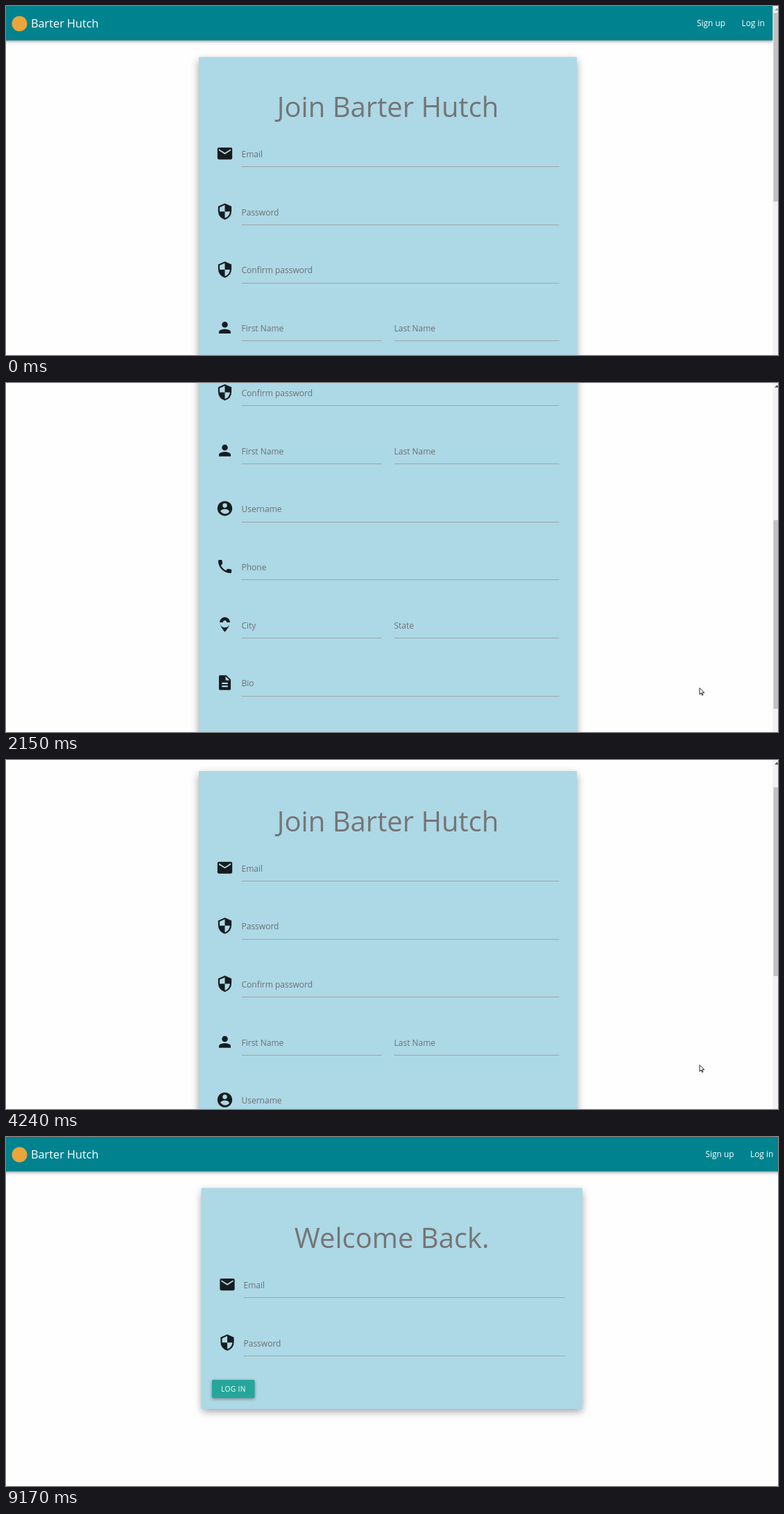
An HTML page with a canvas for the animation above (9710 ms loop, 1113 by 503 pixels).

```html
<!DOCTYPE html>
<html lang="en">
<head>
<meta charset="utf-8">
<title>Barter Hutch</title>
<style>
  html, body { margin: 0; width: 100%; height: 100%; overflow: hidden; background: #fefefe; }
  canvas { display: block; }
</style>
</head>
<body>
<canvas id="stage" width="1113" height="503"></canvas>
<script>
const W = 1113, H = 503, LOOP = 9710, LOGIN_AT = 6290;
const BRAND = 'Barter Hutch';
const CARD = '#add8e6', INK = '#161c1e';
const ROW_PITCH = 83.66;
const ctx = document.getElementById('stage').getContext('2d');

// Icons live on a 24-unit grid: an ink outline and the holes cut from it
const disc = (x, y, r) => `M${x - r} ${y}a${r} ${r} 0 1 0 ${2 * r} 0a${r} ${r} 0 1 0 ${-2 * r} 0Z`;
const box = (x, y, w, h) => `M${x} ${y}h${w}v${h}h${-w}Z`;
const bust = (r, top) => `M${12 - r} ${top + 4}c0-3 ${r - 3}-4 ${r}-4s${r} 1 ${r} 4`;
const icon = (ink, holes = '') => [new Path2D(ink), new Path2D(holes)];
const icons = {
  mail: icon('M4 4H20Q22 4 22 6V18Q22 20 20 20H4Q2 20 2 18V6Q2 4 4 4Z', 'M4 6L12 11 20 6V8L12 13 4 8Z'),
  shield: icon('M12 1L3 5V11Q3 20 12 23 21 20 21 11V5Z', 'M12 3.2V12H5V6.3ZM12 12H19Q18 19 12 21Z'),
  person: icon(disc(12, 8, 4) + bust(8, 14) + 'v2H4Z'),
  account: icon(disc(12, 12, 10), disc(12, 8, 3) + bust(6, 12.9) + 'Q12 22.4 6 16Z'),
  phone: icon('M4 3H8L9 8 6.6 10.8Q9 15 13.2 17.4L16 15 21 16V20L20 21C10.6 21 3 13.4 3 4Z'),
  place: icon(disc(12, 9, 7) + 'M19 9C19 14 12 22 12 22S5 14 5 9Z', disc(12, 9, 2.5)),
  page: icon('M5 2H14L20 8V21L19 22H5L4 21V3Z', box(8, 12, 8, 2) + box(8, 16, 8, 2) + 'M13 3.5V9H18.5Z'),
  camera: icon(box(2, 5, 20, 16) + 'M7 5L9 3H15L17 5Z', disc(12, 13, 5) + 'M12 9L8 13 12 17 16 13Z')
};
const arrow = new Path2D('M0 0V17L4 13 6.5 19 9 18 6.5 12H12Z');
const hand = new Path2D('M-1 1Q0-1 1 1V5L6 6 7 7V9L6 13H-1L-4 8-3 7-1 8Z');

const signupRows = [
  ['mail', 'Email'], ['shield', 'Password'], ['shield', 'Confirm password'],
  ['person', 'First Name', 'Last Name'], ['account', 'Username'], ['phone', 'Phone'],
  ['place', 'City', 'State'], ['page', 'Bio'], ['camera', 'Profile picture link']
];

const ramp = (t, from, to) => Math.min(1, Math.max(0, (t - from) / (to - from)));
const smooth = u => u * u * (3 - 2 * u);
const progress = (t, from, to) => smooth(ramp(t, from, to));

const scrollAt = t =>
  278 * progress(t, 510, 1300) +
  117 * progress(t, 1690, 2370) +
  53 * progress(t, 2460, 2600) -
  448 * ramp(t, 3683, 4323);

// Each glide: start, end, shift in x, shift in y
const glides = [
  [90, 360, -50.5, -52.5], [4600, 5090, 52, -290], [5230, 5980, 25, -103],
  [6440, 7010, -88, 214], [7140, 7430, -195, 61], [7430, 7670, 104, 78],
  [7930, 8480, 110, 74], [8700, 9170, 36, 31]
];
const pointerAt = t => glides.reduce(([x, y], [from, to, dx, dy]) => {
  const u = progress(t, from, to);
  return [x + dx * u, y + dy * u];
}, [1050, 492]);

function rect(x, y, w, h, color) {
  ctx.fillStyle = color;
  ctx.fillRect(x, y, w, h);
}

function text(str, x, y, size, color, align = 'left') {
  ctx.font = `${size}px "Open Sans", "Noto Sans", sans-serif`;
  ctx.textAlign = align;
  ctx.fillStyle = color;
  ctx.fillText(str, x, y);
}

function raised(x, y, w, h, color, blur, drop, alpha, radius = 0) {
  ctx.save();
  ctx.shadowColor = `rgba(0,0,0,${alpha})`;
  ctx.shadowBlur = blur;
  ctx.shadowOffsetY = drop;
  ctx.fillStyle = color;
  ctx.beginPath();
  ctx.roundRect(x, y, w, h, radius);
  ctx.fill();
  ctx.restore();
}

function placed(x, y, scale, paint) {
  ctx.save();
  ctx.translate(x, y);
  ctx.scale(scale, scale);
  paint();
  ctx.restore();
}

function drawIcon([ink, holes], x, y) {
  placed(x - 12.8, y - 12.8, 25.6 / 24, () => {
    ctx.fillStyle = INK;
    ctx.fill(ink);
    ctx.fillStyle = CARD;
    ctx.fill(holes, 'evenodd');
  });
}

function drawNav(right, hover) {
  raised(-10, -10, right + 10, 59.5, '#00838f', 5, 1.5, .5);
  rect(right - 57, 0, 57, 49.5, `rgba(0,0,0,${.1 * hover})`);
  ctx.fillStyle = '#eba53a';
  ctx.beginPath();
  ctx.arc(19.5, 25.5, 11, 0, 7);
  ctx.fill();
  text(BRAND, 36, 31, 16.3, '#fff');
  text('Sign up', right - 109.5, 29, 11.9, '#fff');
  text('Log in', right - 45, 29, 11.9, '#fff');
}

function drawField(label, x, end, y) {
  text(label, x, y + 4.5, 12, '#6d7173');
  rect(x, Math.round(y + 17.8), end - x, 1, '#9fa5a8');
}

function drawForm(card, title, rows, action, scroll = 0) {
  const { left, width, height, fieldX, fieldEnd } = card;
  raised(left, 73.5 - scroll, width, height, CARD, 11, 4, .38);
  text(title, left + width / 2, 160 - scroll, 40, '#757575', 'center');
  rows.forEach(([name, label, second], i) => {
    const y = 213.5 + ROW_PITCH * i - scroll;
    drawIcon(icons[name], left + 37.5, y - .9);
    drawField(label, fieldX, second ? 541.5 : fieldEnd, y);
    if (second) drawField(second, 559.5, fieldEnd, y);
  });
  const top = Math.round(266.5 + ROW_PITCH * (rows.length - 1) - scroll);
  raised(left + 15.5, top, 61.5, 26, '#26a69a', 4, 1.5, .4, 1.5);
  ctx.letterSpacing = '0.4px';
  text(action, left + 46.4, top + 17, 10.2, '#fff', 'center');
  ctx.letterSpacing = '0px';
}

function drawScrollbar(scroll) {
  rect(1105.5, 0, 8, H, '#f1f1f1');
  rect(1106.5, 10 + .512 * scroll, 7, 272, '#c1c1c1');
  ctx.fillStyle = scroll ? '#505050' : '#a3a3a3';
  ctx.beginPath();
  ctx.moveTo(1108, 6.5);
  ctx.lineTo(1111.5, 3);
  ctx.lineTo(1115, 6.5);
  ctx.fill();
}

function drawSignup(t) {
  const scroll = Math.max(0, scrollAt(t));
  drawForm({ left: 278, width: 545, height: 905, fieldX: 339.5, fieldEnd: 797.5 },
    'Join ' + BRAND, signupRows, 'SIGN UP', scroll);
  placed(0, -scroll, 1, () => drawNav(1105.5, ramp(t, 5900, 6200)));
  drawScrollbar(scroll);
}

function drawLogin(t) {
  drawForm({ left: 281.5, width: 549.5, height: 318.5, fieldX: 342.5, fieldEnd: 806 },
    'Welcome Back.', signupRows.slice(0, 2), 'LOG IN');
  drawNav(1118, 1 - ramp(t, 6520, 6820));
}

function drawPointer(t) {
  if (t < 90 || t >= 9170) return;
  const [x, y] = pointerAt(t);
  const [shape, scale] = y < 50 ? [hand, .95] : [arrow, .56];
  placed(x + .5, y, scale, () => {
    ctx.fillStyle = '#fff';
    ctx.fill(shape);
    ctx.strokeStyle = '#222';
    ctx.lineWidth = 1 / scale;
    ctx.stroke(shape);
  });
}

function draw(t) {
  rect(0, 0, W, H, '#fefefe');
  if (t < LOGIN_AT) drawSignup(t);
  else drawLogin(t);
  drawPointer(t);
}

const start = performance.now();
function tick() {
  draw((performance.now() - start) % LOOP);
  requestAnimationFrame(tick);
}
tick();
</script>
</body>
</html>
```
